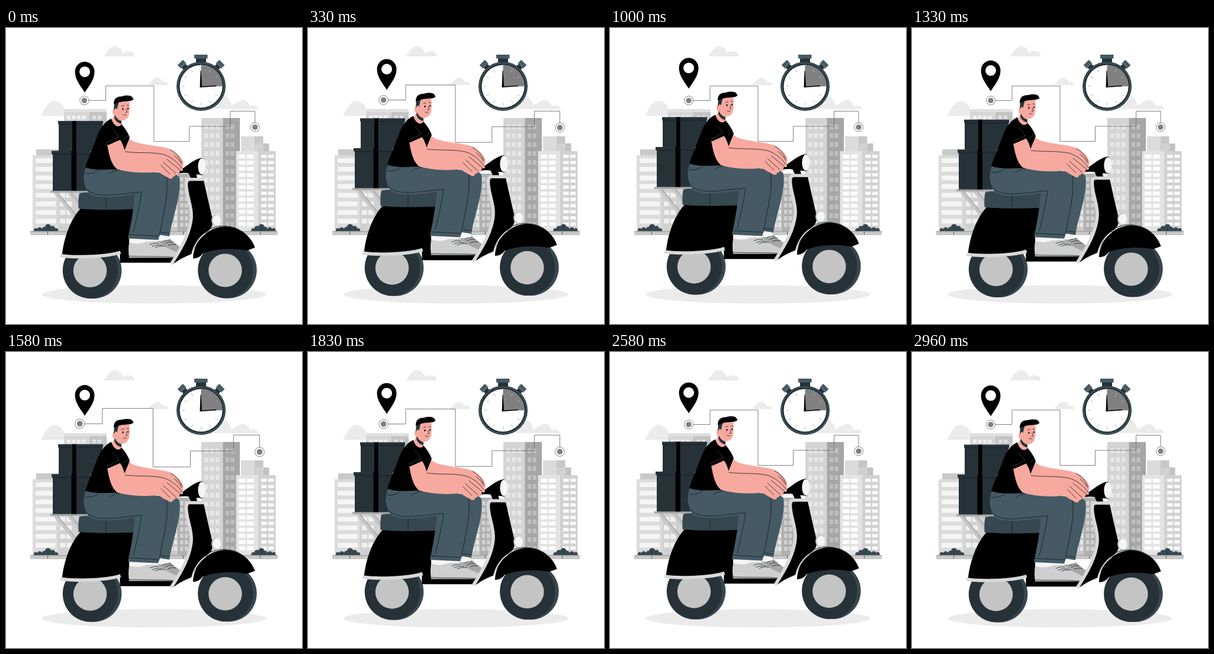
Write an HTML page that moves like this. It is 500 by 500 pixels and loops after 3000 ms.

```html
<!DOCTYPE html>
<html lang="en">
<head>
<meta charset="utf-8">
<title>Delivery scooter</title>
<style>
  html, body { margin: 0; width: 100%; height: 100%; overflow: hidden; background: #fff; }
  svg { display: block; width: 100vw; height: 100vh; }
  .line { fill: none; stroke: #111b20; stroke-width: .8; stroke-linecap: round; stroke-linejoin: round; }
  .trim { fill: none; stroke: #d9d9d9; stroke-width: 5.6; stroke-linejoin: round; }
</style>
</head>
<body>
<svg viewBox="0 0 500 500" xmlns="http://www.w3.org/2000/svg">
  <ellipse cx="250" cy="450" rx="189.5" ry="15.5" fill="#ebebeb"/>

  <g id="clouds" fill="#ebebeb">
    <path d="M165 48C172 40 175 31 184 30.500C192 31 196 37 198 43C201 39 205 38 209 40C214 39 217 42 217 48Z"/>
    <path d="M239 96.500C245 92 249 84 256 84C261 85 264 88 266 92C270 90 274 92 274 96.500Z"/>
    <path d="M59 148.500C64 141 69 124 82 123C91 124 97 130 99 137L116 148.500Z"/>
    <path d="M340 137C350 127 358 115 368 114C376 116 379 125 381 131C387 128 394 121 402 121.500C408 123 410 128 412 132C420 129 425 132 426 137Z"/>
  </g>

  <g id="city"></g>

  <g id="bushes" fill="#37474f">
    <g id="bush">
      <path d="M47 343C46 338 51 336.500 53 339.500C54 335.500 59 335.500 61 339C62 336 64 335 66 336C66 330 75 329.500 76 335C79 333 83 335 83 338.500C87 337.500 89 340 88 343Z"/>
      <path d="M71 334V343" stroke="#263238" stroke-width=".7"/>
    </g>
    <use href="#bush" transform="translate(502.500 0) scale(-1 1)"/>
  </g>

  <g id="watch">
    <g id="knob">
      <path d="M300 64L306 70" stroke="#263238" stroke-width="9"/>
      <path d="M292 65L301 56" stroke="#455a64" stroke-width="6.500"/>
      <path d="M295 68L304 59" stroke="#263238" stroke-width="1.500"/>
    </g>
    <use href="#knob" transform="translate(659 0) scale(-1 1)"/>
    <path d="M321 50H338V60H321Z" fill="#263238"/>
    <path d="M318 45H340.500V51.500H318Z" fill="#455a64"/>
    <circle cx="329.500" cy="98.400" r="41.500" fill="#263238"/>
    <circle cx="329.500" cy="98.400" r="39.500" fill="none" stroke="#455a64" stroke-width="1.600"/>
    <circle cx="329.500" cy="98.400" r="36" fill="#fff"/>
    <path d="M329.500 98.400V62.400A36 36 0 0 1 365.500 98.400Z" fill="#808080"/>
    <g id="ticks" stroke="#b3b3b3" stroke-width=".9"></g>
    <path d="M327.500 100.500L328.500 72H329.500L331 98.500L355 97V98.500Z"/>
  </g>

  <g id="rider">
    <g id="rack" fill="none">
      <path d="M83 278L121 324M106 278L134 312" stroke="#c7c7c7" stroke-width="5"/>
      <path d="M87 278L125 324M110 278L136 310" stroke="#a6a6a6" stroke-width="1.500"/>
      <path d="M75 276.500H136" stroke="#a6a6a6" stroke-width="3.500"/>
    </g>
    <g id="boxes" fill="#263238">
      <path d="M89 160H163V208H89ZM79 210H142V275H79Z"/>
      <path d="M88 157H164V162H88ZM77 207.500H143V213H77Z"/>
      <path d="M112 157H118.500V207H112ZM110.500 207H119V275H110.500Z" fill="#000"/>
      <path d="M89 162.300H163M79 213.300H142" class="line"/>
    </g>

    <g id="wheels">
      <g id="wheel">
        <ellipse cx="148" cy="409.500" rx="47.300" ry="47.500" fill="#37474f"/>
        <ellipse cx="142.500" cy="409.500" rx="46.700" ry="47.500" fill="#263238"/>
        <circle cx="142" cy="410" r="28.200" fill="#c4c4c4"/>
      </g>
      <use href="#wheel" x="228.300" y="-.5"/>
    </g>

    <g id="body">
      <path d="M192 345H215L208 387H290L284 396.700H192.500Z"/>
      <path d="M126 305C110 322 98 352 94.500 384L132 385C160 385 180 381 193 378L209 360L219 303Z"/>
      <path d="M92 384.500C112 387.500 165 388 193.500 379" class="trim"/>
      <path d="M124 279C150 275 200 278 218 281V306C190 307 150 308 122.500 305C122 295 122 287 124 279Z" fill="#37474f"/>
      <path d="M169 284V306" class="line"/>
    </g>

    <g id="shoes">
      <path d="M256 357L277 356C284 363 293 368 298 373L296 381H255Z" fill="#a6a6a6"/>
      <path d="M235 353H250V366H235Z" fill="#f5f5f5"/>
      <path d="M258 349L273 351L276 359L256 360Z" fill="#f5f5f5"/>
      <path d="M208 355H236V365H208Z" fill="#f5f5f5"/>
      <path d="M208 362C218 365 228 365 237 361L256 360C264 369 279 374 288 379L290 388H208Q206 375 208 362Z" fill="#cfcfcf"/>
      <path d="M208 385.500C235 387 262 385 289 387.500" class="line"/>
      <path d="M243 366Q252 362 258 364M247 369Q256 365 263 367M252 371Q260 367 268 369M265 361Q272 357 277 359M269 364Q277 360 282 362M274 367Q281 364 287 366" class="line"/>
    </g>

    <g id="front">
      <path d="M307 258H334C338 276 344 302 349 323C350 338 344 341 337 346C325 357 319 372 313 382C303 386 296 389 283 398C300 368 314 346 314 320C315 300 304 282 307 258Z"/>
      <path d="M316 389.500C316 365 336 337 370 335.300C397 335 415 354 420.500 371L407 376C385 371 350 373 332 381Q327 389 316 389.500Z"/>
      <path d="M346 339C362 332 382 334 394 341" stroke="#37474f" stroke-width="1.200" fill="none"/>
      <path d="M335 255.500H312Q303.500 255 304.500 266C305 285 314 300 313 320C311 346 297 371 279 399" class="trim"/>
      <path d="M314 382C317 368 326 354 337 347" fill="none" stroke="#d9d9d9" stroke-width="2"/>
      <path d="M305 238L318 236L323 253H312Z"/>
      <path d="M290 243C303 235 313 225 327 220L331 247C320 250 308 242 291 246Z"/>
      <ellipse cx="330" cy="234" rx="7.300" ry="14.500"/>
      <ellipse cx="331" cy="234" rx="6.700" ry="13.700" fill="#f5f5f5"/>
      <ellipse cx="354.500" cy="325" rx="7.500" ry="10" fill="#bdbdbd"/>
      <ellipse cx="356" cy="325" rx="7" ry="9" fill="#f5f5f5"/>
    </g>

    <g id="trousers">
      <path d="M135 235C128 253 131 273 142 281C160 290 200 284 217 281C217 300 211 331 206 355.500L257 358L260 349.500L276 352C281 320 297 282 293 253C290 244 268 246 248 243L192 235Z" fill="#455a64"/>
      <path d="M131 259C133 278 150 284 180 282L229 277C226 300 220 325 215 345M271 250C274 275 270 292 267 310L259 350M209 349L257 351.500M261 345L276 347M134 246C145 247 154 244 158 238M175 246Q182 241 192 240" class="line"/>
    </g>

    <g id="head">
      <path d="M184 126L208.500 121C208 128 210.500 142 206.500 150C203 156 196 157 194.500 156L196 165C191 171 181 168 177 159L182.500 148C179 145 179 137 183 136Z" fill="#f7a99f"/>
      <path d="M183 124L191 123L187.500 137L185 135L182 140Z" fill="#263238"/>
      <path d="M184 147C187 153 190.500 156 194.800 156.500L195 161.500C189 161 184.500 157 183 151Z" fill="#263238"/>
      <path d="M182 129C182 119 187 115.500 196 115.500C203 113.500 210 113.500 213 116.500L215.500 120C213 124 207 123 202 124C194 124 188 126 182 129Z"/>
      <circle cx="184.300" cy="141.500" r="3.200" fill="#f7a99f"/>
      <ellipse cx="197.500" cy="137" rx="1.100" ry="1.800"/>
      <ellipse cx="206" cy="136" rx="1" ry="1.700"/>
      <path d="M195 132.300Q197 130 199.500 131.500M204 130.500Q206 129.500 207.500 131M203 137L204.500 142.500L202 143M198 146.500Q200.500 148.500 203 146.500" class="line"/>
    </g>

    <g id="torso">
      <path d="M203 184L216 192C235 198 258 199 276 204C287 209 296 217 300 228L298 240L270 232L250 217L200 210Z" fill="#f7a99f"/>
      <path d="M178 153C165 159 158 171 152 188C144 209 138 222 134 235.500C153 242 174 238 191 239L200 207L209 185C206 176 200 168 195 162.500C191 170 181 165 178 153Z"/>
      <path d="M171 197L191 187C197 193 199 202 201 209C220 211 245 211 263 215C278 219 290 229 297 237L299 239Q299 243 294 241L292 247Q290 250 286 247Q287 251 282 251Q282 256 276 254C268 250 262 246 257 243C235 246 205 244 187 238C177 229 174 214 171 197Z" fill="#f7a99f"/>
      <path d="M163 184C168 176 181 178 192 185L192.500 189L172 198Z"/>
      <path d="M201 209C222 212 247 209 267 214C281 219 291 228 297 237M262 232L277 247M266 227L287 246M272 222L294 240M278 206Q291 213 297 227M284 215Q292 221 297 230" class="line"/>
      <path d="M170 194L191 184M199 188L207 182M180 171Q188 177 190 184" class="line" style="stroke:#37474f"/>
    </g>
  </g>

  <path id="pin" fill-rule="evenodd" d="M133 109C126 98 116.500 87 116.500 74A16.500 17 0 0 1 149.500 74C149.500 87 140 98 133 109ZM124 74A9 9 0 0 0 142 74A9 9 0 0 0 124 74Z"/>

  <g id="route" fill="none" stroke="#737373" stroke-width=".9">
    <path d="M133 122.500H169V98H250V191.500H309.500V166H378.500V140.500H420V167.500"/>
    <g fill="#fff">
      <circle cx="133" cy="122.500" r="7.500"/>
      <circle cx="420" cy="167.500" r="7.500"/>
    </g>
    <g fill="#808080" stroke="none">
      <circle cx="133" cy="122.500" r="4.600"/>
      <circle cx="420" cy="167.500" r="4.600"/>
    </g>
  </g>
</svg>

<script>
const NS = "http://www.w3.org/2000/svg";
const byId = id => document.getElementById(id);

function add(parent, tag, attrs) {
  const el = document.createElementNS(NS, tag);
  for (const key in attrs) el.setAttribute(key, attrs[key]);
  parent.append(el);
}

const city = byId("city");
const block = (x, y, w, h, fill) => add(city, "rect", { x, y, width: w, height: h, fill });

// Grid of equal windows: column positions, first row, row step, last edge.
function panes(xs, w, h, top, step, end, fill) {
  let d = "";
  for (let y = top; y + h <= end; y += step)
    for (const x of xs) d += `M${x} ${y}h${w}v${h}h${-w}z`;
  add(city, "path", { d, fill });
}

// Left side
block(98, 137, 72, 206, "#d6d6d6");
block(98, 137, 72, 5, "#e0e0e0");
block(141, 142, 29, 201, "#c4c4c4");
panes([103, 111.5, 120, 128.5], 6, 6, 148, 12, 343, "#f0f0f0");
panes([146, 155], 6, 6, 148, 12, 343, "#e0e0e0");
block(51, 205, 45, 11, "#c9c9c9");
block(45, 215, 46, 128, "#dbdbdb");
panes([50], 34, 8, 220, 14.6, 343, "#f5f5f5");
block(88, 215, 45, 128, "#d1d1d1");
panes([91, 102], 9, 8, 220, 14.6, 343, "#f0f0f0");

// Middle
block(270, 246, 22, 97, "#c7c7c7");
block(290, 246, 32, 97, "#b0b0b0");
panes([277, 284], 5, 7, 252, 11, 343, "#e6e6e6");
panes([294, 302], 5.5, 7, 252, 11, 343, "#d1d1d1");

// Tower
block(330, 152, 37, 191, "#d4d4d4");
block(366.5, 152, 28.5, 191, "#a6a6a6");
panes([335, 344.5, 354], 6.5, 8, 163, 15, 343, "#e6e6e6");
panes([371, 379.5], 6, 8, 163, 15, 343, "#bfbfbf");

// Right side
block(397, 183, 24, 30, "#dbdbdb");
block(420, 183, 14.5, 30, "#c7c7c7");
block(421, 195, 15, 18, "#d1d1d1");
block(435, 195, 9.5, 18, "#c2c2c2");
block(388.5, 208, 38, 135, "#e3e3e3");
block(426, 208, 29.5, 135, "#d1d1d1");
panes([393, 407], 11.5, 6, 214, 10.4, 340, "#fff");
panes([431, 443], 9.5, 5.5, 214, 10.4, 340, "#fafafa");

// Pavement
block(41, 343, 418, 7, "#c9c9c9");
block(41, 343, 418, 1.5, "#a6a6a6");
for (const x of [70, 299, 429]) block(x, 344, 1, 5, "#455a64");

for (let i = 0; i < 12; i++)
  add(byId("ticks"), "path", { d: "M329.500 66V71", transform: `rotate(${i * 30} 329.500 98.400)` });

const CYCLE = 1500, LEAD = 6;
const beat = [[0, 1], [.1, 1.1], [.3, 1], [.4, 1], [.5, 1.1], [.6, 1], [1, 1]];

function scaleAt(p) {
  const i = beat.findIndex(step => step[0] > p);
  const [a, from] = beat[i - 1], [b, to] = beat[i];
  return from + (to - from) * (p - a) / (b - a);
}

function draw(time) {
  const p = ((time + LEAD) % CYCLE) / CYCLE;
  const lift = -10 * (1 - Math.abs(1 - 2 * p));
  for (const id of ["rider", "pin"])
    byId(id).setAttribute("transform", `translate(0 ${lift})`);
  byId("route").setAttribute("transform",
    `translate(276.500 145) scale(${scaleAt(p)}) translate(-276.500 -145)`);
}

const start = performance.now();
function tick() {
  draw(performance.now() - start);
  requestAnimationFrame(tick);
}
tick();
</script>
</body>
</html>
```
